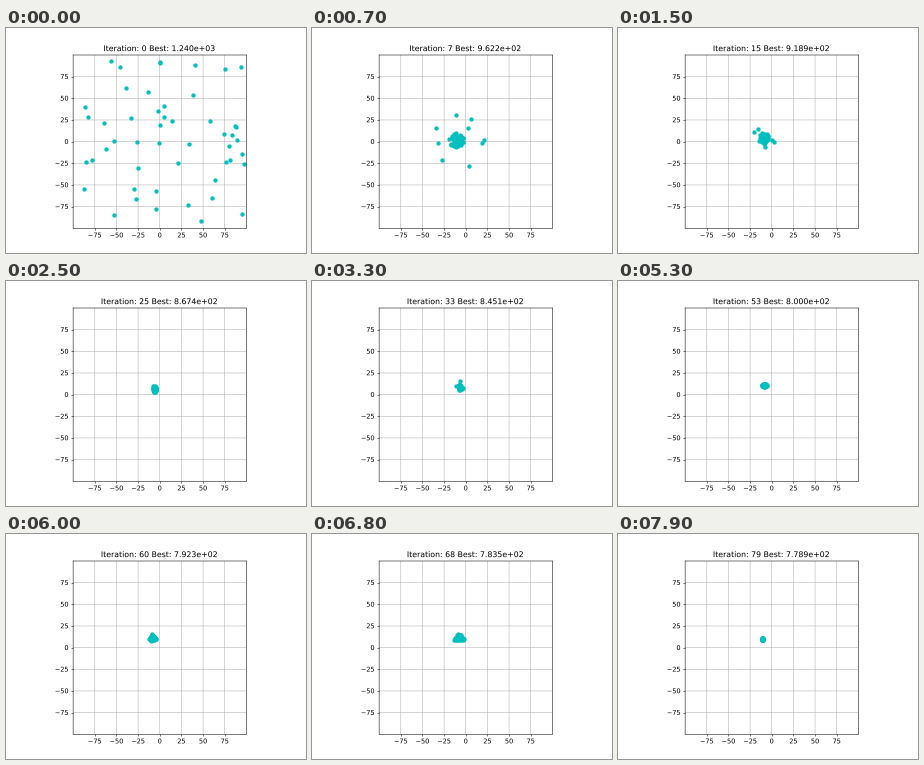
A matplotlib script for the animation above (8000 ms loop, 300 by 225 pixels).

```python
import numpy as np
import matplotlib.pyplot as plt
from matplotlib.animation import FuncAnimation
from matplotlib.patheffects import Normal

# Unsnapped lines and outlined text keep sub-pixel positions at this low dpi
plt.rcParams.update({
    "font.family": "DejaVu Sans",
    "text.hinting": "none",
    "path.snap": False,
})

W, H, DPI = 300, 225, 46.875
LIMIT, COUNT, FRAMES = 100, 50, 80

# Iteration, best cost, swarm centre x and y, radii x and y, three-lobe amount
STAGES = np.array([
    (0, 1240.0, -11.0, 2.0, 7.0, 8.0, 0),
    (7, 962.2, -11.0, 2.0, 7.0, 8.0, 0),
    (25, 867.4, -5.8, 6.4, 1.8, 3.8, 0),
    (41, 823.4, -8.1, 11.0, 1.0, 2.9, 0),
    (53, 800.0, -8.6, 10.7, 3.0, 1.6, 0),
    (68, 783.5, -7.8, 11.3, 4.6, 3.3, 0.45),
    (79, 778.9, -10.7, 9.9, 1.2, 0.9, 0),
])
STEPS = STAGES[:, 0]

rng = np.random.default_rng(4)
index = np.arange(COUNT)
start = rng.uniform(-LIMIT, LIMIT, (COUNT, 2))
phase = rng.uniform(0, 2 * np.pi, COUNT)
speed = rng.uniform(0.5, 1.1, COUNT)

# Every fifth dot joins late; every tenth keeps wandering further out
settle = np.where(index % 5 == 0, 6, 2)
reach = np.where(index % 10 == 0, 8, 1)

# Even spiral filling of the unit disc
theta = index * np.pi * (3 - 5 ** 0.5)
rho = np.sqrt((index + 0.5) / COUNT)


def circle(angle):
    return np.column_stack([np.cos(angle), np.sin(angle)])


def stage(i, column):
    return np.interp(i, STEPS, STAGES[:, column])


def swarm(i):
    cx, cy, rx, ry, lobe = (stage(i, c) for c in range(2, 7))
    radius = rho * (1 - lobe * np.sin(3 * theta))
    cluster = [cx, cy] + radius[:, None] * circle(theta) * [rx, ry]

    # Wandering fades out at each stage and over time
    leg = np.interp(i, STEPS, range(len(STEPS)))
    wander = reach * np.exp(-i / 40) * np.sin(np.pi * leg) ** 2
    cluster += wander[:, None] * circle(phase + speed * i)

    return cluster + (start - cluster) * np.exp(-i / settle)[:, None]


fig, ax = plt.subplots(figsize=(W / DPI, H / DPI), dpi=DPI)
ax.set(xlim=(-LIMIT, LIMIT), ylim=(-LIMIT, LIMIT), aspect="equal",
       xticks=range(-75, 76, 25), yticks=range(-75, 76, 25))
ax.grid(True)
ax.set_axisbelow(True)
dots = ax.scatter(*start.T, s=36, c="c", lw=0.5, zorder=2.4)
title = ax.set_title("")
for text in [title, *ax.get_xticklabels(), *ax.get_yticklabels()]:
    text.set_path_effects([Normal()])


def update(i):
    dots.set_offsets(swarm(i))
    best = np.exp(np.interp(i, STEPS, np.log(STAGES[:, 1])))
    title.set_text(f"Iteration: {i} Best: {best:.3e}")
    return dots, title


anim = FuncAnimation(fig, update, frames=FRAMES, interval=100,
                     repeat=True, repeat_delay=0)
plt.show()
```
